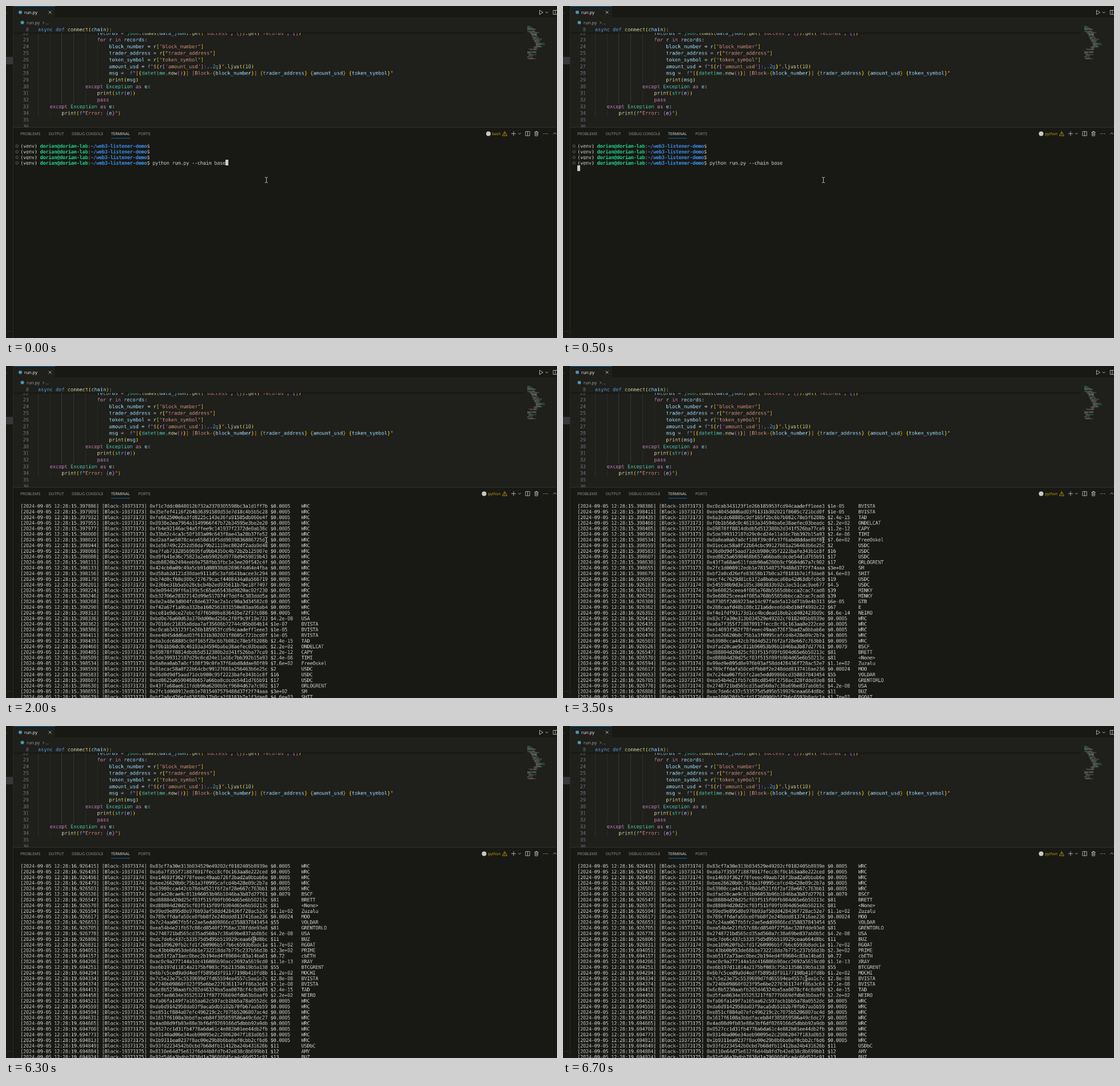
An HTML page with a canvas that plays this animation: 964 by 581 pixels, repeating every 8 s.

```html
<!DOCTYPE html>
<html lang="en">
<head>
<meta charset="utf-8">
<title>Terminal listener</title>
<style>
html, body { margin: 0; width: 100%; height: 100%; overflow: hidden; background: #181814; }
body { position: relative; text-rendering: geometricPrecision; }
body > * { position: absolute; }
#editor { left: 13px; top: 22px; right: 0; height: 190px; background: #1f1f1b; }
#panel { left: 13px; top: 212px; right: 0; bottom: 0; border-top: 1px solid #2f2f2b; }
canvas { left: 0; top: 0; width: 964px; }
svg { left: 0; top: 0; font-family: "Open Sans", "Noto Sans", sans-serif; }
</style>
</head>
<body>
<div id="editor"></div>
<div id="panel"></div>
<canvas id="screen" width="1569" height="946"></canvas>
<svg width="964" height="581" fill="none" stroke-width=".8">
  <defs><path id="beam" d="M-2.5 -4.8Q0 -4.8 0 -3.4Q0 -4.8 2.5 -4.8M0 -3.4V3.4M-2.5 4.8Q0 4.8 0 3.4Q0 4.8 2.5 4.8"/></defs>
  <path d="M12.5 0V581M0 569.5H12M86 21.5H964" stroke="#2f2f2b"/>
  <path d="M0 89H12V102H0Z" fill="#37373a"/>
  <path d="M13 0H86V22H13Z" fill="#1f1f1b"/>
  <path d="M13 .5H86M184 231.5H217" stroke="#0078d4"/>
  <g fill="#4b93b8"><circle cx="25" cy="11" r="3"/><circle cx="28.5" cy="29" r="3"/></g>
  <g font-size="7.7">
    <text x="32" y="13.7" fill="#f0f0f0">run.py</text>
    <text x="36" y="31.6" fill="#a0a0a0">run.py</text>
    <text x="69" y="31.6" fill="#a0a0a0">…</text>
    <text x="0" y="13" fill="#a0a0a0">.</text>
  </g>
  <g font-size="6.76" fill="#9a9a9a">
    <text x="25" y="225.5">PROBLEMS</text>
    <text x="74.5" y="225.5">OUTPUT</text>
    <text x="115" y="225.5">DEBUG CONSOLE</text>
    <text x="184" y="225.5" fill="#e7e7e7">TERMINAL</text>
    <text x="231.5" y="225.5">PORTS</text>
    <text id="shell" x="865.5" y="225.5" text-anchor="end" fill="#cca700"></text>
  </g>
  <circle id="mark" cy="223.5" r="4" fill="#c8c8c8"/>
  <path d="M872.5 219.5L876.5 227H868.5ZM872.5 222V224.5M872.5 225.2V226" stroke="#cca700"/>
  <g stroke="#cccccc">
    <path d="M74.5 8.5L79.5 13.5M79.5 8.5L74.5 13.5M933.5 7.5V15L939.5 11.2Z"/>
    <path d="M944 10L946.2 12.3L948.4 10M964 7.5H957.3V14.7H964M961 7.5V14.7"/>
    <path d="M884 223.3H892M888 219.3V227.3M896.2 222.3L898.4 224.5L900.6 222.3"/>
    <path d="M909 219.7H916.3V227H909ZM912.6 219.7V227M957.4 224.5L960.2 221.7L963 224.5"/>
    <path d="M924.5 220.8H931.5M926.8 220.8V219.5H929.2V220.8M925.4 220.8L925.8 227.2H930.2L930.6 220.8M927.2 222.3V225.7M928.8 222.3V225.7"/>
    <path d="M940.5 223.5h1.2M943.7 223.5h1.2M946.9 223.5h1.2" stroke-width="1.2"/>
    <path d="M64.5 27L66.7 29.2L64.5 31.4" stroke="#a0a0a0"/>
  </g>
  <g id="minimap" opacity=".55"></g>
  <g id="dots" stroke="#77776f"></g>
  <g id="mouse">
    <use href="#beam" stroke="#111" stroke-width="2"/>
    <use href="#beam" stroke="#eee"/>
  </g>
</svg>
<script>
const LOOP = 8000, VISIBLE = 35;
const $ = id => document.getElementById(id);

// The screen is laid out at full desktop size and shown scaled down.
const screen2d = $("screen").getContext("2d");
const code = { x: 91, numberX: 65, cell: 8.43, row: 19, baseline: 82 };
const term = { x: 41, top: 390, cell: 8, row: 16, baseline: 404 };
const PANEL_TOP = 345;

const colours = {
  t: "#d4d4d4", k: "#c586c0", d: "#569cd6", f: "#dcdcaa", v: "#9cdcfe", s: "#ce9178", c: "#4ec9b0",
  n: "#b5cea8", g: "#ffd700", m: "#da70d6", l: "#6e7681", o: "#cccccc", G: "#23d18b", P: "#3b8eea"
};

// Writes on a character grid; ~x in the text switches to colour x, capitals are bold.
function write(x, y, cell, markup) {
  const parts = markup.split(/~([a-zA-Z])/);
  for (let i = 1; i < parts.length; i += 2) {
    const [style, text] = [parts[i], parts[i + 1]];
    screen2d.font = `${/[A-Z]/.test(style) ? "bold " : ""}14px "DejaVu Sans Mono", monospace`;
    screen2d.textRendering = "geometricPrecision";
    screen2d.letterSpacing = "0px";
    screen2d.letterSpacing = `${cell - screen2d.measureText("0").width}px`;
    screen2d.fillStyle = colours[style];
    screen2d.fillText(text, x, y);
    x += text.length * cell;
  }
}

function fill(colour, x, y, w, h) {
  screen2d.fillStyle = colour;
  screen2d.fillRect(x, y, w, h);
}

// Indent level, then the line itself.
const codeLines = `5 ~vrecords~t = ~cjson~t.~floads~g(~vdata_json~g)~t.~fget~g(~s'success'~t, ~m{}~g)~t.~fget~g(~s'records'~t, ~m[]~g)
5 ~kfor ~vr ~kin ~vrecords~t:
6 ~vblock_number~t = ~vr~g[~s"block_number"~g]
6 ~vtrader_address~t = ~vr~g[~s"trader_address"~g]
6 ~vtoken_symbol~t = ~vr~g[~s"token_symbol"~g]
6 ~vamount_usd~t = ~df~s"$~g{~vr~m[~s'amount_usd'~m]~d:,.2g~g}~s"~t.~fljust~g(~n10~g)
6 ~vmsg~t =  ~df~s"[~g{~cdatetime~t.~fnow~m()~g}~s] [Block-~g{~vblock_number~g}~s] ~g{~vtrader_address~g} {~vamount_usd~g} {~vtoken_symbol~g}~s"
6 ~fprint~g(~vmsg~g)
4 ~kexcept ~cException ~kas ~ve~t:
5 ~fprint~g(~cstr~m(~ve~m)~g)
5 ~kpass
1 ~kexcept ~cException ~kas ~ve~t:
2 ~fprint~g(~df~s"Error: ~m{~ve~m}~s"~g)
0 
0 `.split("\n");

function drawCodeLine(number, y, level, markup) {
  const indent = 4 * code.cell;
  for (let i = 0; i < level; i++) fill("#40403c", Math.round(code.x + i * indent), y - 14, 1, code.row);
  write(code.numberX - String(number).length * code.cell, y, code.cell, "~l" + number);
  write(code.x + level * indent, y, code.cell, markup);
}

codeLines.forEach((line, i) => drawCodeLine(22 + i, code.baseline + i * code.row, +line[0], line.slice(2)));
fill("#1f1f1b", 22, 36, 1453, 40);
fill("#0006", 22, 76, 1453, 2);
drawCodeLine(8, 72, 0, "~dasync def ~fconnect~g(~vchain~g)~t:");

let seed = 7;
const random = () => (seed = seed * 16807 % 2147483647) / 2147483647;
const tints = ["#c586c0", "#9cdcfe", "#ce9178", "#4ec9b0", "#dcdcaa"];
$("minimap").innerHTML = [..."000000.0122333.3444455566666645512..000111.0.01"].map((level, i) => {
  if (level === ".") return "";
  const x = 912 + level * 2.46, w = 5 + random() * 13, y = 35.8 + i * 1.23;
  return [0, 1].map(k => `<path d="M${x + k * w * .5} ${y}h${w * .45}" stroke="${tints[random() * 5 | 0]}"/>`).join("");
}).join("");

$("dots").innerHTML = [0, 1, 2, 3].map(i => `<circle cx="19.3" cy="${245.2 + i * 9.83}" r="2.2"/>`).join("");

// Trades: "second block" headings, then microseconds, address, amount, symbol.
const trades = `15 19373172
139064 6cd4e86f518b4a0cdb9e319bd40f2244ae5af9ef $0.0028 BARIO
139157 5a52936f5097afae107674b240afb35c16aeb423 $0.0028 BARIO
139193 cd4ff8fbf6595c1c124ebe407893234eea69492d $50 RIKY
139219 d9a934c82896ba774b05af93435cbead994156f1 $24 RIKY
139265 e31ce1aa5eb8095f5e6e4d8ef3ba50e53cfc7926 $2.4e-08 VOID
139332 0a636844d75b48e0cc1d068c9cd4fe4e87e6ddff $8.8 CARLO
139401 4768cc50e6e4dd1a465bbfad617a86319b71bcf8 $4.6e+02 PRIME
139452 4768cc50e6e4dd1a465bbfad617a86319b71bcf8 $1.3e+03 PRIME
139504 8e86f1e0a3aec4bf334958cd37c443be42283ea8 $17 ◆OrloGrent
139569 b8079189650b2f66bae08262a97bdbcd4faedef0 $1.2e+02 KHAN
139622 03020077e298642f478586b8c06faf932cca2b31 $6.5e+02 FARM
139676 d46716d9e12ad1726557f28ebe8ff08f956623d9 $61 colorpepe
139726 1ba0b521ff089bc3d0f8d796fdc0d54c06cbcbb2 $50 ONDEL
139776 834759fd1ce6910f2e9f4f826401870a7c8cd991 $1.2 USDC
139826 834759fd1ce6910f2e9f4f826401870a7c8cd991 $1.2 EMT
15 19373173
397886 f1c7ddc0848012b732a2370305598bc3a1d1ff7b $0.0005 WRC
397909 35efef4116f2b4b36391589d53e7d18c4b5b5c28 $0.0005 WRC
397932 fe662500e6a3fd8225c143e36fa91585db060e4f $0.0005 WRC
397955 0938e2ea7964a3149966f47b72b34595e3be2e20 $0.0005 WRC
397977 fb4e92146ac94a5ffee9c141937f2372de0ab38c $0.0005 WRC
398000 33b62c4ca3c50f103a09c643f8ae43a28b37fe52 $0.0005 WRC
398022 d2aafae5078cace658d16f5dd9039836886725d1 $0.0005 WRC
398044 1e56749c2252d58da79b21119ec802df2ada9d48 $0.0005 WRC
398066 e7fab73328569695fa9bb4350c4b72b2b125907e $0.0005 WRC
398088 d9fb41e36c75823a2eb59826d9778d9459819b43 $0.0005 WRC
398111 db8820b2494eeb9a758fbb3fbc1e3ee20f542c4f $0.0005 WRC
398133 424cb0a09c49a5cb91d08938d62696f4d64e4fba $0.0005 WRC
398156 d58ab2d121d30dae9111d5c3afd641bacee3c294 $0.0005 WRC
398179 b74d0cf68e300c727679cacf4408434a8a566719 $0.0005 WRC
398201 236be31b5a5b28cbcb4b2ed935611b7be18f7497 $0.0005 WRC
398224 9e094439ff6a199c5c65ab65438d9820ac02f230 $0.0005 WRC
398246 b32706e28322142d99e517074f7ddf4c383ddd5a $0.0005 WRC
398268 0e2a48e3d004fc8de6372ac2a1cc90a3d34582c0 $0.0005 WRC
398290 f42a67f1a9ba332ba1602561831550e83aa96ab4 $0.0005 WRC
398313 ce81e9dce27ebcfd7f65086e836435e72f37c086 $0.0005 WRC
398336 bd0e76a60d63a370dd00ed256c2f0f9c9f19e733 $4.2e-08 USA
398362 7018dc21835a8daa7af35606b72744c05b064b14 $1e-07 BVISTA
398386 c0cab343123f1e26b185953fcd94caadeff1eee3 $1e-05 BVISTA
398411 ee4045ddd6ad03f6131b302021f8605c721bcd0f $1e-05 BVISTA
398435 6a3cdc68885c9df165f2bc6b7b082c78e5f6208b $2.4e-15 TAD
398460 f0b1b56dc0c46193a34594ba6e38aefec03beadc $2.2e+02 ONDELCAT
398485 09878ff8814dbdb5d512380b2d341f526ba77ca9 $1.2e-12 CAPY
398509 5de399312187d29c0cd24e11a16c7bb392b15a93 $2.4e-06 TIMI
398534 0a8ea0ab7a0cf108f39c0fe37f6abd8ddae80f89 $7.6e+02 FreeOskel
398559 01ecac58a8f22b64cbc99127601a256463b6e25c $2 USDC
398583 36d0d9df5aad71dcb980c95f2223bafe343b1c8f $16 USDC
398607 ed8625a6590468b657a66ba8cdcde54d1d765b91 $17 USDC
398630 43f7a68ae611fddb90a6200b9cf9604d67a7c902 $17 ORLOGRENT
398655 2fc1d008912edb1e7815407579488d37f2f74aaa $3e+02 SM
398679 bf2a0cd26efe83658b17b0ca2f8181b7e1f3dae8 $4.6e+03 SHIT
16 19373174
926093 ecf4c7629d81c61f2a8babaca60a42d63dbfc0c0 $19 USDC
926183 545598b9d3e105c3803833b92c3ac51cac9ae677 $4.5 USDC
926213 9e60825ceea4f085a768b5565dbbcca2cac7cad8 $39 MINKY
926250 9e60825ceea4f085a768b5565dbbcca2cac7cad8 $39 MINKY
926308 87305f2d69223ae14c97fade5a124d71b9e4b313 $6e-05 GTB
926362 288caafd48b108c121a6deee6d4bd10df4992c22 $67 E
926392 f4e1fdf93173d1cc4bcdead18eb2cd4024230d9c $8.6e-14 NEIRO
926415 83cf7a30e313b034529e49202cf0182405b8939e $0.0005 WRC
926435 a6a7f355f718878917fecc8cf0c163aa8e222ced $0.0005 WRC
926456 e14693f362f78feeec49aab726f3bad2a0bbab6e $0.0005 WRC
926479 bee26620b0c75b1a3f0995cafcd4b428e09c2b7a $0.0005 WRC
926503 63980cca442cb78d4d521f6f2af28e667c763bb1 $0.0005 WRC
926526 dfad20cae9c811b96053b96b1046ba3b87d27761 $0.0079 BSCF
926547 d88804d20d25cf03f515f09fb904d65e6b50213c $81 BRETT
926570 d88804d20d25cf03f515f09fb904d65e6b50213c $81 <None>
926594 99ed9e895d8e976b93af58dd428436f728ac52e7 $1.1e+02 Zuzalu
926617 789cffdafa50ce0fbb8f2e248ddd8137416ae236 $0.00024 MOO
926653 7c24aa067fb5fc2ae5edd09866cd358837843454 $55 VOLDAR
926705 ea54b4e21fb57c88cd8540f2758ac328fdde93e8 $81 GRENTORLO
926778 2748721bd565cd35ad560a7c38a69be837ab0b5c $4.2e-08 USA
926806 dc7de6c437c533575d5d95b519929ceaa664d8bc $11 BUZ
926831 ae109620fb2cfd1f260906b5f7b6c6593b8adc1a $1.7e+02 RGOAT
19 19373175
694051 c43bb0b953de66b1e732218da7b775c237b56d3b $2.3e+02 PRIME
694157 ab51f2a73aec0bec2b194ed4f89604c83a14ba61 $0.72 cbETH
694206 ac0c9a277144a1dc416086b90acc2692a5619cd0 $1.1e-13 XRAY
694251 e6b197d11814a2175bf083c75b21358619b5a138 $55 BTCGRENT
694294 6b7c5ced9a9d4edff5895d3f91177198b410fd8b $1.2e+02 MOCHI
694334 7c5e23e75c5539699d7fd65594ea4557c5aa1c7c $2.8e-08 BVISTA
694374 7240b09860f023f95e6be2276361174ff86a3c64 $7.1e-08 BVISTA
694413 6c8b5230aabfb202d46324ba5aa0078cf4c8d903 $2.4e-15 TAD
694458 d5fae8634e355253217f87770669dfdb63b0aaf9 $2.2e+02 NEIRO
694521 fa06fa149f7a165aa62c597acb1bb5a78a0552dc $0.0005 WRC
694559 da6d9142958da03f9aca5db5102b70fb67aa5b59 $0.0005 WRC
694594 e851cf884a07efc496219c2c7075b5206807ac4d $0.0005 WRC
694631 1617f6108a3bbdfaceb84f385859586a49c6dc27 $0.0005 WRC
694665 4ad08d9fb03e88e3bf6df0269166d5dbbb92a9db $0.0005 WRC
694700 0527cc1d31fb4778a6da61c4e882b01ee44db2fb $0.0005 WRC
694773 93140ad06e34aeb90095e2c29062047f183a0b53 $0.0005 WRC
694813 1b9311ea0237f8ac00e29b8b6ba0af0cbb2cf6d6 $0.0005 WRC
694849 93fd2234542b0cbd7b68dfb11412ba24b431626b $11 USDbC
694884 8110e64d75e612f6d44b8fd7b42e838c8b699bb1 $12 AMY
694924 92d546a3bdbb7838d1a79606045ca4c66d521c91 $13 BUZ`;

const log = [];
let second, blockNo;
for (const line of trades.split("\n")) {
  const [micros, address, amount, symbol] = line.split(" ");
  if (!amount) [second, blockNo] = [micros, address];
  else log.push(`~o[2024-09-05 12:28:${second}.${micros}] [Block-${blockNo}] 0x${address} ${amount.padEnd(10)} ${symbol}`);
}

const prompt = "~o(venv) ~Gdorian@dorian-lab~o:~P~/web3-listener-demo~o$ ";
const prompts = [prompt, prompt, prompt, prompt + "python run.py --chain base"];

// Each stage: start time, terminal lines, text cursor column and row.
const stages = [
  [0, prompts, 73, 3],
  [500, prompts, 0, 4],
  [1700, [...prompts, ...log.slice(0, 15)], 0, 19],
  ...[[2000, 15], [3500, 37], [6300, 57]].map(([t, from]) => [t, log.slice(from, from + VISIBLE), 0, VISIBLE])
];
const mousePath = [[0, 455.5, 304.5], [5700, 440.3, 357], [5800, 433.3, 373.5], [6600, 428, 420], [6700, 425.3, 441.5]];
const current = (list, t) => list.findLast(item => item[0] <= t);

function drawGem(x, y) {
  screen2d.fillStyle = "#35b5d8";
  screen2d.fill(new Path2D(`M${x + 4} ${y - 11}h8l4 4l-8 9l-8 -9z`));
}

function drawTerminal([start, lines, col, row]) {
  screen2d.clearRect(0, PANEL_TOP, 1569, 946 - PANEL_TOP);
  lines.forEach((line, i) => {
    const y = term.baseline + i * term.row;
    const gem = line.indexOf("◆") - 2;
    write(term.x, y, term.cell, line.replace("◆", "  "));
    if (gem > 0) drawGem(term.x + gem * term.cell, y);
  });
  fill(colours.o, term.x + col * term.cell, term.top + row * term.row, term.cell, term.row);
  $("dots").style.display = start < 2000 ? "" : "none";
  $("shell").textContent = start ? "python" : "bash";
  $("mark").setAttribute("cx", start ? 836.5 : 844);
}

let shown;
function draw(now) {
  const t = now % LOOP, stage = current(stages, t);
  if (stage !== shown) drawTerminal(shown = stage);
  const [, x, y] = current(mousePath, t);
  $("mouse").setAttribute("transform", `translate(${x} ${y})`);
  requestAnimationFrame(draw);
}
draw(performance.now());
</script>
</body>
</html>
```
